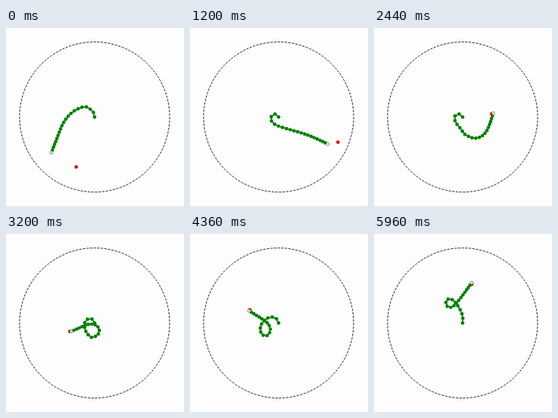
An HTML page with a canvas that plays this animation: 223 px wide and 223 px high, repeating every 6000 ms.

```html
<!DOCTYPE html>
<html lang="en">
<head>
<meta charset="utf-8">
<title>Reaching arm</title>
<style>
html, body { margin: 0; width: 100%; height: 100%; overflow: hidden; background: #fdfdfd; }
canvas { display: block; width: 223px; height: 223px; }
</style>
</head>
<body>
<canvas id="stage"></canvas>
<script>
const SIZE = 223, LOOP = 6000, STEP = 40, LAG = 30, LINKS = 20;
const BASE = [111, 111.5], REACH = 94;
const lengths = Array.from({ length: LINKS }, (_, i) => 5.9 - 0.126 * i);

// Smooth interpolation through knots of the form [t, ...values].
function track(knots) {
  const slope = (a, b, k) => (b[k] - a[k]) / (b[0] - a[0]);
  const tangent = (i, k) => {
    const p = knots[i - 1], q = knots[i], r = knots[i + 1];
    if (!p) return slope(q, r, k);
    if (!r) return slope(p, q, k);
    return slope(p, q, k) - slope(p, r, k) + slope(q, r, k);
  };
  const last = knots.length - 1;
  return t => {
    t = Math.max(knots[0][0], Math.min(knots[last][0], t));
    let i = 0;
    while (i < last - 1 && t > knots[i + 1][0]) i++;
    const a = knots[i], b = knots[i + 1], h = b[0] - a[0], u = (t - a[0]) / h;
    const w = u * u * (3 - 2 * u);
    return a.slice(1).map((v, n) => {
      const k = n + 1;
      return v + (b[k] - v) * w
        + h * u * (1 - u) * ((1 - u) * tangent(i, k) - u * tangent(i + 1, k));
    });
  };
}

// Link headings of an arm laid along a curve through the given points.
function headings(points) {
  let u = 0;
  const knots = [BASE, ...points].map((p, i, all) => {
    if (i) u += Math.sqrt(Math.hypot(p[0] - all[i - 1][0], p[1] - all[i - 1][1]));
    return [u, ...p];
  });
  const curve = track(knots), n = 400, line = [[0, ...BASE]];
  for (let i = 1; i <= n; i++) {
    const p = curve(u * i / n), q = line[i - 1];
    line.push([q[0] + Math.hypot(p[0] - q[1], p[1] - q[2]), ...p]);
  }
  const total = lengths.reduce((a, b) => a + b), scale = line[n][0] / total;
  let s = 0, prev = BASE, angle = null;
  return lengths.map(len => {
    s += len * scale;
    const k = line.findIndex(p => p[0] >= s - 1e-6);
    const p = line[k < 0 ? n : k].slice(1);
    let a = Math.atan2(p[1] - prev[1], p[0] - prev[0]);
    if (angle !== null) a += 2 * Math.PI * Math.round((angle - a) / (2 * Math.PI));
    prev = p;
    return angle = a;
  });
}

const pose = track([
  [0, [[109, 105], [104, 101], [99, 99], [84, 106], [73, 119], [65, 137], [57, 156]]],
  [680, [[109, 105], [104, 102], [98, 101.5], [91, 107], [88, 118], [90, 130], [97, 141], [117, 163]]],
  [1720, [[105, 109], [103, 115], [109, 118], [117, 116.5], [145, 112], [183, 106]]],
  [3200, [[107, 106], [101, 107], [98, 114], [101, 124], [108, 130], [117, 124], [115, 116], [106, 113], [81, 122]]],
  [4360, [[108, 106], [101, 104], [95, 107], [89, 115], [89, 124], [95, 129], [101, 123], [99, 114], [75, 96]]],
  [5000, [[110, 106], [103, 96], [97, 92], [89, 90.5], [84, 95], [89, 100], [96, 97], [98, 85], [102, 59]]],
  [5960, [[111, 104], [109, 98], [104, 90], [97, 83], [90, 83], [90, 90], [96, 92], [102, 87], [122, 62]]]
].map(([t, points]) => [t, ...headings(points)]));

const target = track([
  [0, 88, 174], [680, 156, 155], [1280, 187, 139], [1720, 181, 104], [1960, 173, 100],
  [2560, 139, 110], [3200, 80, 122], [3600, 67, 118], [3840, 66, 109], [4360, 75, 95],
  [5000, 102, 58], [5400, 114, 48.5], [5780, 122, 52.5], [5960, 122.5, 63]
]);

// How far the tip still trails while it catches up.
const gap = track([
  [0, -31, -18], [680, -36, 7], [980, -24, 6], [1280, -8, 0], [1500, 0, 0], [1720, 0, 0]
]);

function joints(angles) {
  let [x, y] = BASE;
  const out = [[x, y]];
  angles.forEach((a, i) => {
    x += lengths[i] * Math.cos(a);
    y += lengths[i] * Math.sin(a);
    out.push([x, y]);
  });
  return out;
}

// Damped least squares: bend every joint a little until the tip is in place.
function solve(angles, goal) {
  for (let n = 0; n < 14; n++) {
    const pts = joints(angles), tip = pts[LINKS];
    let ex = goal[0] - tip[0], ey = goal[1] - tip[1];
    const d = Math.hypot(ex, ey);
    if (d < 0.05) break;
    const clip = Math.min(1, 8 / d);
    ex *= clip;
    ey *= clip;
    const cols = pts.slice(0, LINKS).map(p => [p[1] - tip[1], tip[0] - p[0]]);
    let a = 20, b = 0, c = 20;
    for (const [jx, jy] of cols) {
      a += jx * jx;
      b += jx * jy;
      c += jy * jy;
    }
    const det = a * c - b * b;
    const fx = (c * ex - b * ey) / det, fy = (a * ey - b * ex) / det;
    let turn = 0;
    angles = angles.map((v, i) => v + (turn += cols[i][0] * fx + cols[i][1] * fy));
  }
  return joints(angles);
}

const canvas = document.getElementById("stage");
const ctx = canvas.getContext("2d");
const ratio = window.devicePixelRatio || 1;
canvas.width = canvas.height = Math.round(SIZE * ratio);
ctx.scale(ratio, ratio);

function disc([x, y], r, fill) {
  ctx.beginPath();
  ctx.arc(x, y, r, 0, 2 * Math.PI);
  ctx.fillStyle = fill;
  ctx.fill();
}

function draw(t) {
  ctx.fillStyle = "#fdfdfd";
  ctx.fillRect(0, 0, SIZE, SIZE);

  ctx.beginPath();
  ctx.arc(...BASE, REACH, 0, 2 * Math.PI);
  ctx.strokeStyle = "#111";
  ctx.lineWidth = 0.9;
  ctx.setLineDash([3, 1.5]);
  ctx.stroke();
  ctx.setLineDash([]);

  const lead = target(t - LAG), off = gap(t);
  const pts = solve(pose(t), [lead[0] + off[0], lead[1] + off[1]]);
  ctx.beginPath();
  pts.forEach(p => ctx.lineTo(...p));
  ctx.strokeStyle = "#008000";
  ctx.lineWidth = 1.5;
  ctx.lineJoin = "round";
  ctx.stroke();
  pts.slice(0, LINKS).forEach(p => disc(p, 2.2, "#008000"));

  disc(target(t), 2.2, "#f00000");
  disc(pts[LINKS], 1.9, "#fff");
  ctx.strokeStyle = "#2f8f2f";
  ctx.lineWidth = 0.8;
  ctx.stroke();
}

function tick() {
  const t = performance.now() % LOOP;
  draw(Math.floor(t / STEP) * STEP);
  requestAnimationFrame(tick);
}
tick();
</script>
</body>
</html>
```
